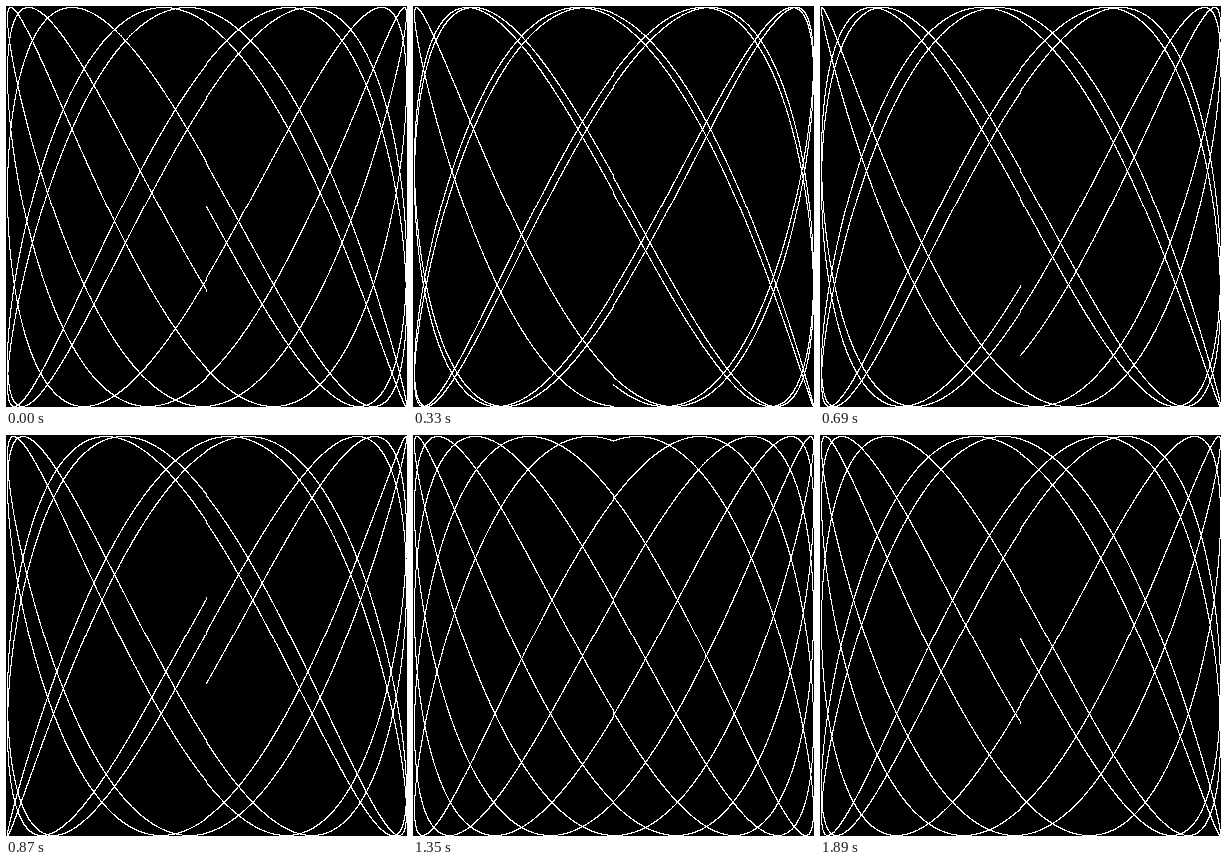
Write an HTML page with a canvas that moves like this. It is 401x401 px and loops after 1.92 s.

```html
<!DOCTYPE html>
<html lang="en">
<head>
<meta charset="utf-8">
<title>Lissajous curve</title>
<style>
  html, body { margin: 0; width: 100%; height: 100%; overflow: hidden; background: #000; }
  canvas { display: block; width: 401px; height: 401px; image-rendering: pixelated; }
</style>
</head>
<body>
<canvas id="stage" width="401" height="401"></canvas>
<script>
const SIZE = 200, SIDE = 2 * SIZE + 1;
const CYCLES = 5, RES = 0.001;
const FREQ = 1.8139808639388589;
const STEPS = 64, DELAY = 30, PHASE_STEP = 0.1;
const BLACK = 0xff000000, WHITE = 0xffffffff;

const ctx = document.getElementById('stage').getContext('2d');
const image = ctx.createImageData(SIDE, SIDE);
const pixels = new Uint32Array(image.data.buffer);

// Rounds toward zero after the half-pixel shift, which kinks the centre lines.
const toPixel = v => SIZE + Math.trunc(v * SIZE + 0.5);

function draw(phase) {
  pixels.fill(BLACK);
  for (let t = 0; t < CYCLES * 2 * Math.PI; t += RES) {
    const x = toPixel(Math.sin(t));
    const y = toPixel(Math.sin(t * FREQ + phase));
    pixels[y * SIDE + x] = WHITE;
  }
  ctx.putImageData(image, 0, 0);
}

const start = performance.now();
let shown = -1;

function tick() {
  const step = Math.floor((performance.now() - start) / DELAY) % STEPS;
  if (step !== shown) {
    shown = step;
    draw(step * PHASE_STEP);
  }
  requestAnimationFrame(tick);
}
tick();
</script>
</body>
</html>
```
